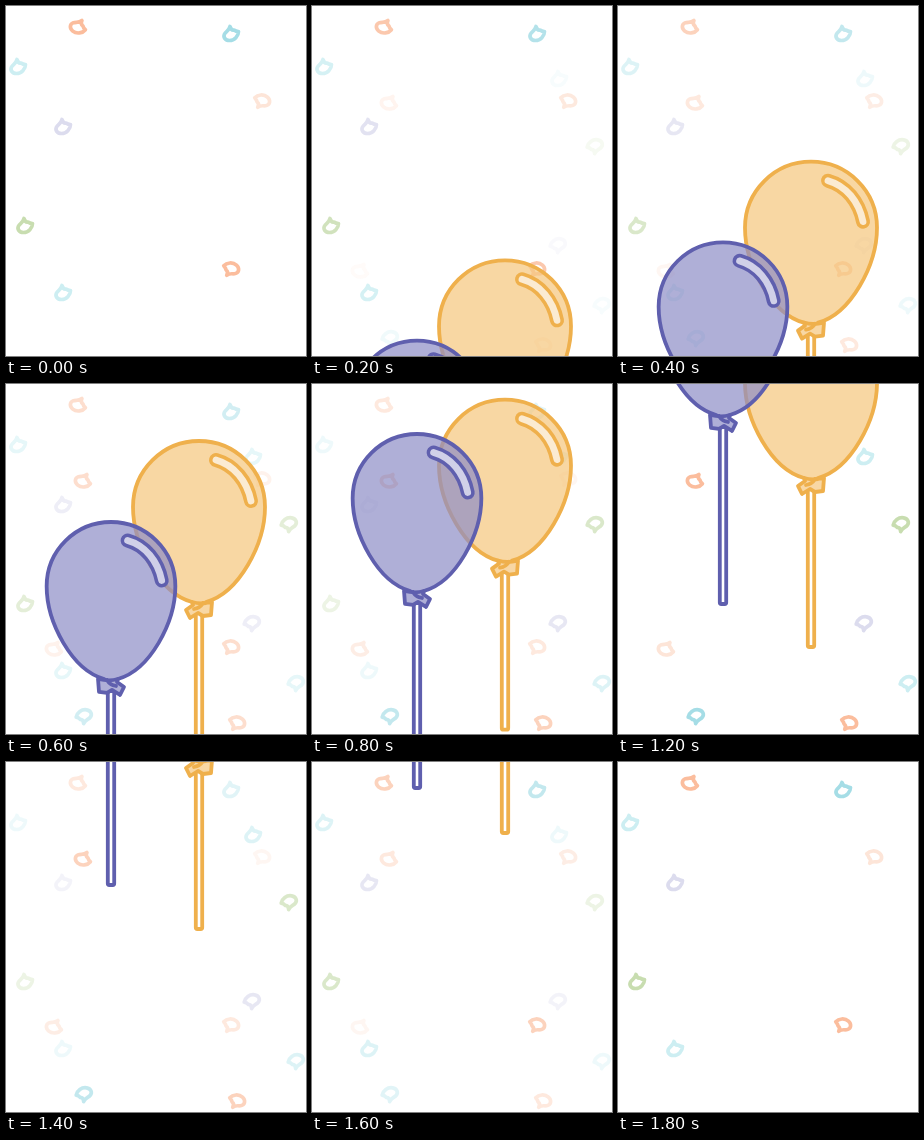
These frames come from a looping animation (300 px wide and 350 px high, 1.9 s). An HTML page:

```html
<!DOCTYPE html>
<html lang="en">
<head>
<meta charset="utf-8">
<title>Balloons</title>
<style>
  html, body { margin: 0; width: 100%; height: 100%; overflow: hidden; background: #fff; }
  svg { display: block; width: 300px; height: 350px; }
</style>
</head>
<body>
<svg id="stage" viewBox="0 0 300 350" fill="none" stroke-linecap="round" stroke-linejoin="round"></svg>
<script>
const LOOP = 1900, STEP = 100;
const stage = document.getElementById('stage');

function add(parent, tag, attrs) {
  const el = document.createElementNS('http://www.w3.org/2000/svg', tag);
  for (const key in attrs) el.setAttribute(key, attrs[key]);
  parent.appendChild(el);
  return el;
}

// Linear interpolation between values placed 600 ms apart
function track(values, t) {
  const i = Math.min(values.length - 2, Math.floor(t / 600));
  return values[i] + (values[i + 1] - values[i]) * (t / 600 - i);
}

const ORANGE = '#fbbd9d', PEACH = '#fde5d8', TEAL = '#a5dde6',
      CYAN = '#cdeef2', LILAC = '#dcdcee', GREEN = '#c8ddb0';
const BIT = 'M-1 -7.5Q0 -3.5 3 -4Q5 -2.5 7.5 -2.5C7.5 2 3.5 6.5 -1.5 6.5' +
            'C-6 6.5 -8 3 -6.5 0C-5 -3 -2 -3 -1 -7.5Z';

function confetti(bits) {
  const group = add(stage, 'g', { 'stroke-width': 3.7 });
  for (const [x, y, color, turn] of bits)
    add(group, 'path', { d: BIT, stroke: color, transform: `translate(${x} ${y}) rotate(${turn})` });
  return group;
}

const fading = confetti([
  [72, 21, ORANGE, 39], [225, 28, TEAL, 0], [12, 61, CYAN, 0],
  [57, 121, LILAC, 0], [256, 95, PEACH, -138], [19, 220, GREEN, 0],
  [225, 263, ORANGE, -138], [57, 287, CYAN, 0]
]);
const rising = confetti([
  [77, 97, ORANGE, 39], [247, 73, CYAN, 0], [283, 140, GREEN, 190],
  [246, 239, LILAC, 190], [48, 265, PEACH, 39], [290, 299, CYAN, 190],
  [78, 332, TEAL, 190], [231, 339, ORANGE, -138]
]);

// Local origin is the top centre of the balloon
function balloon(o) {
  const root = add(stage, 'g', { stroke: o.line, 'stroke-width': 3.8 });
  const sized = d => d.replace(/-?\d+/g, n => +(n * o.size).toFixed(2));
  const knotY = 161 * o.size;

  add(root, 'rect', {
    x: -3.2, y: knotY + 11, width: 6.4, height: o.end - knotY - 11, rx: 1.5, fill: '#fff'
  });
  add(root, 'path', {
    d: sized('M-7 161C-40 152 -66 103 -66 66C-66 29 -36 0 0 0C36 0 66 29 66 66C66 103 40 152 7 161'),
    fill: o.fill, 'fill-opacity': 0.7
  });

  const shine = sized('M17 19C35 24 48 40 52 60');
  add(root, 'path', { d: shine, 'stroke-width': 14 });
  add(root, 'path', { d: shine, 'stroke-width': 6.8, stroke: o.shine });

  const knot = add(root, 'g', { transform: `translate(0 ${knotY}) scale(${o.flip} 1)` });
  add(knot, 'path', { d: 'M-7 0L-6 3L-13 8L-9 16L-1 11L4 14L12 13L13 0L7 1Q0 2 -7 0Z', fill: o.pale });
  add(knot, 'path', { d: 'M-5 7Q1 6 4 1' });

  return t => root.setAttribute('transform', `translate(${o.x} ${o.y + track(o.lift, t)})`);
}

const movers = [
  balloon({
    x: 193, y: 57, size: 1, end: 330, flip: 1, lift: [296, 0, -124, -412],
    line: '#efb04c', fill: '#f5c67d', pale: '#f8d7a4', shine: '#fbebd2'
  }),
  balloon({
    x: 105, y: 138, size: 0.975, end: 346, flip: -1, lift: [295, 0, -264, -555],
    line: '#5f5fae', fill: '#8d8dc6', pale: '#afafd7', shine: '#d0d0e8'
  })
];

function draw(ms) {
  const t = Math.floor((ms % LOOP) / STEP) * STEP;
  const fade = track([1, 0.5, 0, 1], t);
  fading.setAttribute('opacity', fade);
  rising.setAttribute('opacity', 1 - fade);
  for (const move of movers) move(t);
}

let start;
function tick(now) {
  if (start === undefined) start = now;
  draw(now - start);
  requestAnimationFrame(tick);
}
draw(0);
requestAnimationFrame(tick);
</script>
</body>
</html>
```
